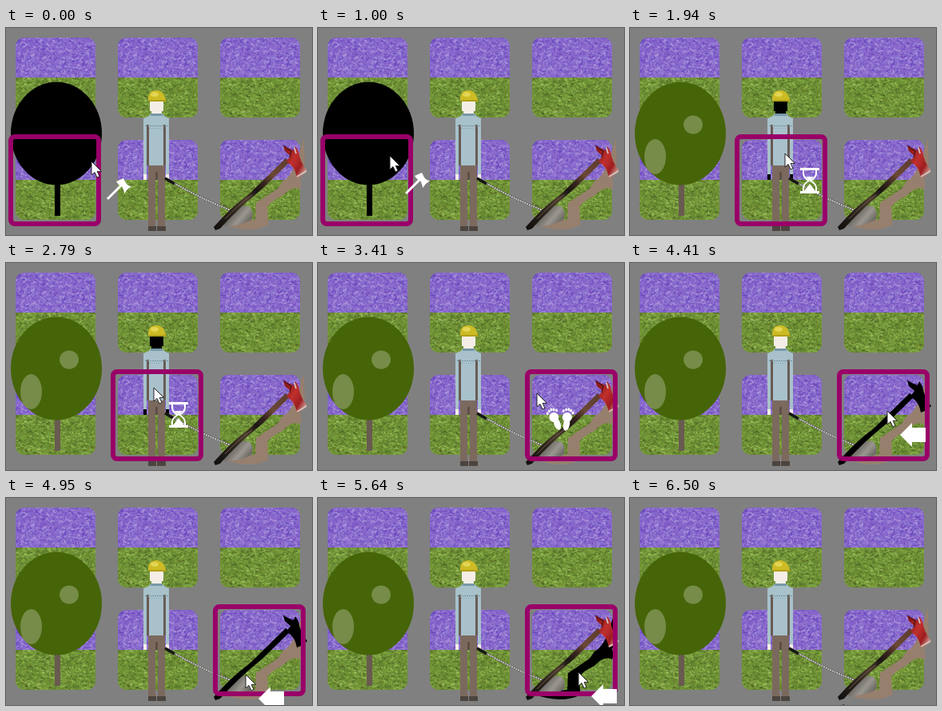
Write an HTML page with a canvas that moves like this. It is 383 by 259 pixels and loops after 6580 ms.

```html
<!DOCTYPE html>
<html lang="en">
<head>
<meta charset="utf-8">
<title>Hover highlights</title>
<style>
html, body { margin: 0; width: 100%; height: 100%; overflow: hidden; background: #808080; }
canvas { display: block; }
</style>
</head>
<body>
<canvas id="stage" width="383" height="259"></canvas>
<script>
const ctx = document.getElementById('stage').getContext('2d');
const LOOP = 6580, FRAME_GONE = 6500;

// Pointer moves: first step, last step (ms), number of steps, destination
const moves = [
  [60, 60, 1, 102, 165], [460, 610, 3, 125, 163], [930, 1080, 3, 72, 159],
  [1230, 1540, 5, 199, 158], [1710, 1710, 1, 198, 158], [1860, 2080, 4, 190, 156],
  [2330, 2490, 3, 223, 157], [2640, 2790, 3, 185, 156], [3020, 3640, 9, 318, 166],
  [3710, 3790, 2, 323, 164], [3860, 4020, 3, 338, 184], [4340, 4570, 4, 305, 185],
  [4650, 4950, 5, 300, 221], [5030, 5180, 3, 329, 232], [5410, 5720, 5, 325, 214],
  [6420, 6500, 2, 267, 258]
];

function pointerAt(t) {
  let x = 107, y = 167;
  for (const [start, end, steps, toX, toY] of moves) {
    if (t < start) break;
    const passed = end > start ? (t - start) / (end - start) * (steps - 1) : 0;
    const part = Math.min(steps, Math.floor(passed + 0.1) + 1) / steps;
    x += (toX - x) * part;
    y += (toY - y) * part;
  }
  return { x: Math.round(x), y: Math.round(y) };
}

const path = d => new Path2D(d);
const fill = (shape, color) => { ctx.fillStyle = color; ctx.fill(shape); };
const rect = (x, y, w, h, color) => { ctx.fillStyle = color; ctx.fillRect(x, y, w, h); };

function line(shape, width, color, dash = []) {
  ctx.lineWidth = width;
  ctx.strokeStyle = color;
  ctx.setLineDash(dash);
  ctx.stroke(shape);
  ctx.setLineDash([]);
}

function ellipse(x, y, rx, ry, color, turn = 0) {
  ctx.beginPath();
  ctx.ellipse(x, y, rx, ry, turn, 0, Math.PI * 2);
  ctx.fillStyle = color;
  ctx.fill();
}

function gradient(x0, y0, x1, y1, stops) {
  const g = ctx.createLinearGradient(x0, y0, x1, y1);
  for (const at in stops) g.addColorStop(+at, stops[at]);
  return g;
}
const steel = gradient(278, 225, 304, 247, { 0: '#4d4b48', 0.35: '#77736e', 0.6: '#9a9690', 1: '#5d5953' });
const wood = gradient(262, 250, 354, 166, {
  0: '#12100e', 0.25: '#2c241d', 0.42: '#4b3c2e', 0.55: '#1b1614', 0.66: '#35241d', 0.78: '#6b4836', 1: '#5d3c2e'
});
const paint = gradient(348, 160, 376, 176, { 0: '#8e1b1b', 0.4: '#c0302d', 0.75: '#9c1d20', 1: '#c98d85' });

const dirt = path('M373 137L374 178L368 189Q371 197 368 202Q358 197 346 210Q331 217 327 224L328 241L329 246Q318 252 302 252Q284 251 272 246L290 242L312 240L313 219L340 201L346 192Q358 186 366 160Z');
const blade = path('M274 235Q284 221 304 223Q311 230 308 239Q298 247 273 248Z');
const chain = path('M200 188Q238 211 281 228');
const grip = path('M199 188L211 195');
const handle = path('M260 249Q283 223 305 207L350 163L356 167L321 201Q290 226 268 251L262 253Z');
const axeHead = path('M347 147L355 151L360 153L362 148L366 154Q368 168 377 179Q371 185 364 187Q362 176 356 171L351 167L356 160L349 154Z');
const pointer = path('M0 0V17L4 13.5L7 20L10 18.6L7.2 12.4H12.5Z');
const hourglass = path('M23 20V25Q23 30 30 34Q23 38 23 43V48M39 20V25Q39 30 32 34Q39 38 39 43V48');
const sand = path('M19 18H43V21H19ZM19 47H43V50H19ZM26 29H36L31 34ZM31 38L38 47H24Z');
const arrow = path('M16 30L31 15V21H48V39H31V45Z');
const hatchetShaft = path('M20 47L38 29');
const hatchetHead = path('M31 25L40 21L43 27Q46 31 50 31Q45 34 41 40Q40 33 37 30L34 29Z');

// Meadow tile: lavender above, grass below
function makeTile() {
  const tile = document.createElement('canvas');
  tile.width = tile.height = 100;
  const g = tile.getContext('2d');
  let seed = 7;
  const random = () => (seed = seed * 16807 % 2147483647) / 2147483647;
  g.beginPath();
  g.roundRect(0, 0, 100, 100, 11);
  g.clip();
  const field = (top, base, hue, sat, low, span) => {
    g.save();
    g.beginPath();
    g.rect(0, top, 100, 50);
    g.clip();
    g.fillStyle = base;
    g.fillRect(0, top, 100, 50);
    for (let i = 0; i < 1500; i++) {
      const x = random() * 100, y = top + random() * 50;
      const light = low + random() * span, lean = random() * 8 - 4;
      g.strokeStyle = `hsl(${hue + random() * 14} ${sat}% ${light}% / 0.6)`;
      g.lineWidth = 0.8 + random() * 0.7;
      g.beginPath();
      g.moveTo(x, y);
      g.quadraticCurveTo(x + lean, y - 1, x + lean * 1.3, y + random() * 6 - 3);
      g.stroke();
    }
    g.restore();
  };
  field(0, '#8766ca', 250, 50, 44, 38);
  field(50, '#6b8e34', 74, 46, 22, 40);
  return tile;
}
const tile = makeTile();

function drawTree(hover) {
  rect(61, 190, 7, 45, hover ? '#000' : '#695a50');
  ellipse(63, 132, 57, 64.5, hover ? '#000' : '#466408');
  if (hover) return;
  ellipse(79, 121, 12, 11.5, '#768c48');
  ellipse(31.5, 161, 13.5, 22, '#768c48');
}

function drawPerson(hover) {
  const skin = hover ? '#000' : '#f4eee6', shirt = '#a8c1cb', trousers = '#7b695e', shoe = '#4c443f';
  rect(180, 91, 17, 13, skin);
  rect(182, 103, 13, 4, skin);
  fill(path('M178 91V87Q179 78 188 78Q197 78 199 87L201 92H180Z'), '#cdbb25');
  ellipse(186, 83, 5, 3, '#e2d654');
  line(path('M179 91H200'), 1, '#94830f');
  for (const x of [172, 200]) {
    rect(x, 182, 4, 8, skin);
    rect(x, 113, 4, 70, shirt);
  }
  fill(path('M181 107H196L198 110L204 113V122H172V113L179 110Z'), shirt);
  rect(179, 121, 18, 51, shirt);
  rect(181, 107, 15, 3, '#7798a6');
  rect(176, 121, 3, 51, '#675b53');
  rect(197, 121, 3, 51, '#675b53');
  line(path('M174 122.5H203'), 1, '#718f9e', [2, 1]);
  line(path('M179 125.5H197'), 1, '#7d9dab', [1, 2]);
  rect(178, 172, 21, 10, trousers);
  rect(178, 181, 9, 68, trousers);
  rect(190, 181, 9, 68, trousers);
  rect(187, 180, 3, 10, '#5d4f47');
  rect(178, 248, 10, 6, shoe);
  rect(189, 248, 11, 6, shoe);
}

function drawTools(hover) {
  fill(dirt, hover === 'dirt' ? '#000' : '#977f6e');
  line(chain, 2.6, '#55554f');
  line(chain, 1.5, '#dcdcdc', [2, 1]);
  line(grip, 3.5, '#151515');
  fill(blade, steel);
  if (hover === 'axe') {
    fill(handle, '#000');
    fill(axeHead, '#000');
    return;
  }
  fill(handle, wood);
  line(path('M274 239Q292 220 308 209'), 1, '#6a5945');
  fill(axeHead, paint);
  line(path('M348 148L357 154L355 162'), 1.3, '#4f1414');
  line(path('M361 150L363 157M376 179L364 186'), 1.8, '#d2c6c0');
}

function drawFeet() {
  for (const [x, y, lean] of [[21, 29, -0.35], [38, 29, 0.2]]) {
    ctx.save();
    ctx.translate(x, y);
    ctx.rotate(lean);
    ellipse(0, 1, 6, 6, '#fff');
    ellipse(1, 10, 4, 8, '#fff');
    for (let i = 0; i < 5; i++) ellipse(i * 3 - 6, -6 - Math.sin(i * 0.8) * 3, 1.4, 2, '#fff');
    ctx.restore();
  }
}

const icons = {
  tree: () => { line(hatchetShaft, 3, '#fff'); fill(hatchetHead, '#fff'); },
  person: () => { line(hourglass, 2, '#fff'); fill(sand, '#fff'); },
  axe: () => fill(arrow, '#fff'),
  dirt: () => fill(arrow, '#fff')
};

function hoverAt({ x, y }) {
  if (((x - 63) / 57) ** 2 + ((y - 132) / 64.5) ** 2 < 1) return 'tree';
  if (Math.abs(x - 188) < 10 && y > 78 && y < 254) return 'person';
  const offAxe = (89 * (x - 264) + 94 * (y - 249)) / 129.4;
  if (x > 259 && y < 253 && Math.abs(offAxe) < 9) return 'axe';
  return ctx.isPointInPath(dirt, x, y) ? 'dirt' : '';
}

function draw(t) {
  const at = pointerAt(t), hover = hoverAt(at);
  rect(0, 0, 383, 259, '#808080');
  for (let i = 0; i < 6; i++) ctx.drawImage(tile, 12 + i % 3 * 128, i < 3 ? 12 : 140);
  drawTree(hover === 'tree');
  drawPerson(hover === 'person');
  drawTools(hover);
  if (t < FRAME_GONE) {
    const column = at.x < 129 ? 0 : at.x < 257 ? 1 : 2;
    ctx.beginPath();
    ctx.roundRect(6 + column * 128, 136, 110, 109, 5);
    ctx.lineWidth = 6;
    ctx.strokeStyle = '#990068';
    ctx.stroke();
  }
  ctx.save();
  ctx.translate(at.x, at.y);
  (icons[hover] || drawFeet)();
  fill(pointer, '#fff');
  line(pointer, 1, '#222');
  ctx.restore();
}

const begun = performance.now();
function tick() {
  draw((performance.now() - begun) % LOOP);
  requestAnimationFrame(tick);
}
tick();
</script>
</body>
</html>
```
